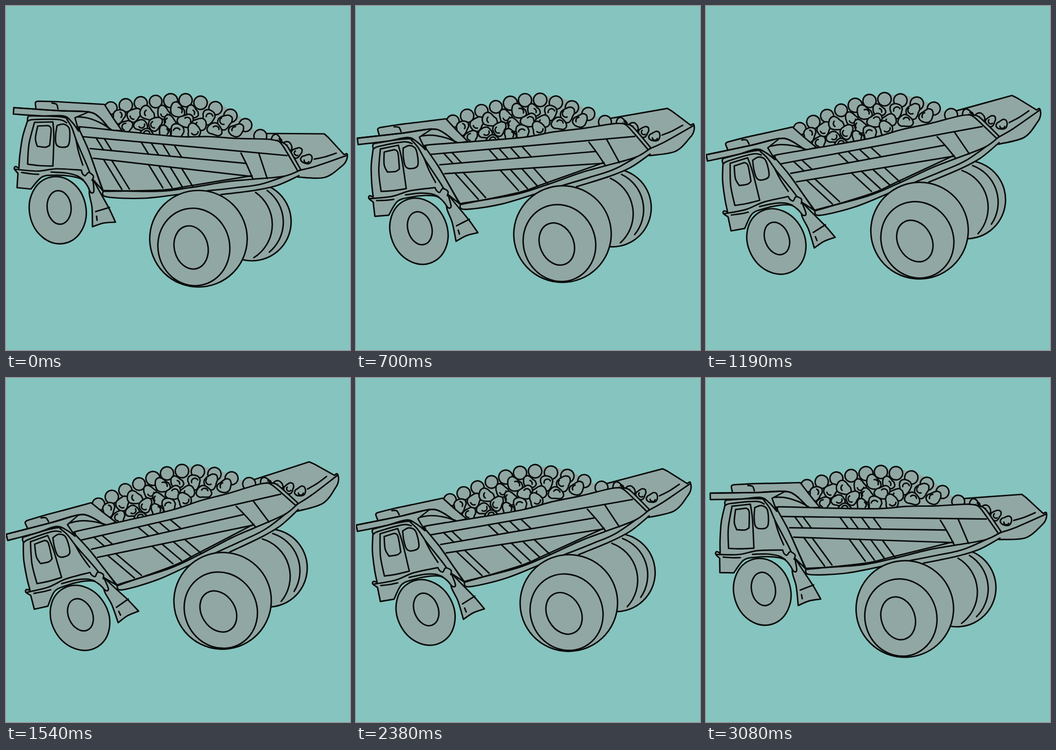
An HTML page for the animation above (3150 ms loop, 748 by 748 pixels).

```html
<!DOCTYPE html>
<html lang="en">
<head>
<meta charset="utf-8">
<title>Rocking dump truck</title>
<style>
  html, body { margin: 0; width: 100%; height: 100%; overflow: hidden; background: #86c4bf; }
  svg { display: block; width: 100vw; height: 100vh; }
  path, ellipse { stroke: #080b0a; stroke-width: 3.2; stroke-linecap: round; stroke-linejoin: round; }
</style>
</head>
<body>
<svg viewBox="0 0 748 748"><g id="truck"></g></svg>
<script>
const truck = document.getElementById('truck');
const GREY = '#91a7a3';
const rad = deg => deg * Math.PI / 180;

function add(tag, attrs) {
  const node = document.createElementNS('http://www.w3.org/2000/svg', tag);
  for (const key in attrs) node.setAttribute(key, attrs[key]);
  truck.append(node);
}

// "x,y x,y | x,y": smooth runs of points, with a corner at each bar.
function smoothPath(text) {
  let d = '', last = null;
  for (const run of text.split('|')) {
    const own = run.trim().split(/\s+/).map(p => p.split(',').map(Number));
    const pts = last ? [last, ...own] : own;
    const at = i => pts[Math.max(0, Math.min(pts.length - 1, i))];
    if (!last) d = 'M' + pts[0];
    for (let i = 0; i < pts.length - 1; i++) {
      const [a, b, c, e] = [at(i - 1), at(i), at(i + 1), at(i + 2)];
      const c1 = [0, 1].map(k => b[k] + (c[k] - a[k]) / 6);
      const c2 = [0, 1].map(k => c[k] - (e[k] - b[k]) / 6);
      d += `C${c1} ${c2} ${c}`;
    }
    last = at(pts.length);
  }
  return d;
}

const shape = text => add('path', { d: smoothPath(text), fill: GREY });
const area = text => add('path', { d: smoothPath(text), fill: GREY, style: 'stroke:none' });
const lines = (...list) => list.forEach(text => add('path', { d: smoothPath(text), fill: 'none' }));
const segment = (x1, y1, x2, y2) => add('path', { d: `M${x1},${y1}L${x2},${y2}`, fill: 'none' });
const oval = (cx, cy, rx, ry, lean = 0) =>
  add('ellipse', { cx, cy, rx, ry, fill: GREY, transform: `rotate(${lean} ${cx} ${cy})` });

let seed = 11;
function random(min, max) {
  seed = (seed * 16807) % 2147483647;
  return min + (max - min) * seed / 2147483647;
}

function arc(x, y, r, from, to) {
  const point = deg => `${x + r * Math.cos(rad(deg))},${y + r * Math.sin(rad(deg))}`;
  add('path', { d: `M${point(from)}A${r},${r} 0 0 1 ${point(to)}`, fill: 'none' });
}

// A lumpy stone with a curl inside it.
function stone(x, y, r) {
  const phase = random(0, 6.28), points = [];
  for (let i = 0; i <= 12; i++) {
    const a = i * Math.PI / 6;
    const reach = r * (1 + 0.14 * Math.sin(2 * a + phase) + 0.1 * Math.sin(3 * a - phase));
    points.push(`${x + reach * Math.cos(a)},${y + reach * Math.sin(a)}`);
  }
  shape(points.join(' '));
  const start = random(0, 360);
  arc(x + random(-3, 3), y + random(-3, 3), r * 0.5, start, start + random(90, 170));
}

function drawFarWheel() {
  oval(535, 469, 85, 85);
  area('440,400 | 570,385 | 535,500 | 500,554 | 440,520');
  arc(494, 475, 85, -55, 58);
  arc(518, 470, 85, -54, 50);
}

function drawFrontWheel() {
  oval(112.5, 444, 61.5, 73.5, -12);
  oval(115.5, 438, 26, 36.5, -6);
}

function drawRearWheel() {
  oval(418.5, 506, 106, 105);
  oval(408.5, 524, 78, 84.5, -12);
  oval(402.5, 525, 36.5, 47.5, -14);
}

function drawTail() {
  shape('556,277 692,278 | 701,286 | 735,323 | 742,322 740,336 728,350 692,373 635,372 | 590,340 | 556,277');
  lines('640,357 675,348 741,325', '670,333 694,328 718,320');
}

function drawHeap() {
  const crest = x => 190 + (x < 393 ? 17 * ((393 - x) / 165) ** 2 : 80 * ((x - 393) / 163) ** 1.6);
  area('218,225 300,206 390,200 450,208 500,234 555,285 | 560,300 | 250,300 | 218,225');
  for (let row = 0; row < 4; row++) {
    for (let i = 0; i < 11; i++) {
      const x = 228 + 32.5 * i + (row % 2) * 16;
      const y = crest(x) + 15 + 23 * row;
      if (row === 0) {
        const r = random(13.5, 15.5);
        oval(x, y, r, r);
      } else if (x < 556 && y < 280) {
        stone(x + random(-4, 4), y + random(-3, 3), random(13, 16));
      }
    }
  }
  for (let i = 0; i < 4; i++) stone(588 + 22 * i, 291 + 14 * i, 11);
}

function drawDeck() {
  shape('65,222 | 64,210 69,207 | 110,208 160,211 214,214 | 232,242 252,271 | 160,270 | 120,230');
  lines('100,211 110,214 113,224');
  area('80,226 180,229 208,240 238,268 | 160,280 | 125,239');
  lines('120,228 165,229 190,233 207,246 224,266', '130,240 175,243 205,254 228,268');
}

function drawBed() {
  area('205,395 | 219,415 300,418 390,407 467,410 540,401 590,390 635,370 | 640,356 | 400,380');
  lines('211,402 | 219,415 300,418 395,407', '467,410 540,401 590,390 637,369', '437,402 500,395 560,386 640,357');
  shape('160,266 | 166,263 270,274 376,284 440,284 504,288 574,290 602,297 | 613,307 641,356 | 605,370 533,377 480,382 400,395 330,403 211,401 | 196,360 178,310 160,280 160,266');

  const beam = x => 284 + 0.095 * (x - 166);
  const railTop = x => 310 + 0.095 * (x - 183);
  const railLow = x => 331 + 0.115 * (x - 190);
  const floor = x => 400 - 0.035 * (x - 211);
  segment(166, beam(166), 611, beam(600));
  segment(183, railTop(183), 521, railTop(521));
  segment(190, railLow(190), 534, railLow(534));
  for (const x of [196, 214, 294, 316, 341, 366]) {
    const low = x + 16, drop = floor(low) - railLow(low);
    segment(x, beam(x), low, railTop(low));
    segment(low, railLow(low), low + 0.6 * drop, floor(low + 0.6 * drop));
  }
  lines('511,320 523,344 537,376', '550,321 568,375', '590,292 602,304 634,358', '211,403 340,400 400,391 535,369');
}

function drawCab() {
  shape('47,249 48,241 60,239 130,243 158,266 | 178,310 196,360 210,401 | 189,377 | 191,403 184,405 177,391 165,377 140,370 105,368 78,372 54,398 | 24,395 | 26,364 | 18,354 21,349 28,353 | 30,325 36,285 47,249');
  shape('17,221 | 16,235 | 80,239 125,239 143,252 158,272 | 150,243 | 180,230 | 120,228 | 17,221');
  area('100,230 | 175,231 | 150,241 | 128,238');
  lines('17,221 120,228 165,229 190,233 207,246 224,266', '132,246 143,264 154,295 175,344 182,362',
    '152,290 158,318 167,346', '48,250 60,247 115,247 132,254');
  // door, windows and bumper
  lines('62,253 102,252 | 104,285 102,348 | 72,347 47,344 | 50,300 62,253',
    '69,261 92,260 | 98,268 95,303 | 86,307 68,305 | 64,288 69,261',
    '111,260 126,257 138,268 136,302 120,307 109,300 108,280 111,260',
    '20,355 68,359 110,354 164,357 | 166,364 172,369 180,362 190,370 187,379',
    '34,362 55,365 71,366', '98,361 130,363 154,369 168,378');
}

function drawFlap() {
  shape('187,378 181,405 187,438 188,480 | 212,472 238,470 | 224,440 204,404 190,378');
  lines('195,447 225,438', '197,457 198,466');
}

[drawFarWheel, drawTail, drawFrontWheel, drawFlap, drawHeap, drawDeck, drawBed, drawCab, drawRearWheel]
  .forEach(part => part());

const LOOP = 3150, STEP = 70, TURN = 2100;

// Eases nose-down, then swings back a little faster and snaps level at the loop.
function tilt(t) {
  if (t <= TURN) return -19.3 * Math.sin(Math.PI / 2 * t / 1950);
  const u = (t - TURN) / STEP;
  return -19.1 + 0.938 * u + 0.007 * u * u;
}

function render(now) {
  const t = Math.floor((now % LOOP) / STEP) * STEP;
  truck.setAttribute('transform', `rotate(${tilt(t).toFixed(3)} 378 332)`);
  requestAnimationFrame(render);
}
render(0);
</script>
</body>
</html>
```
